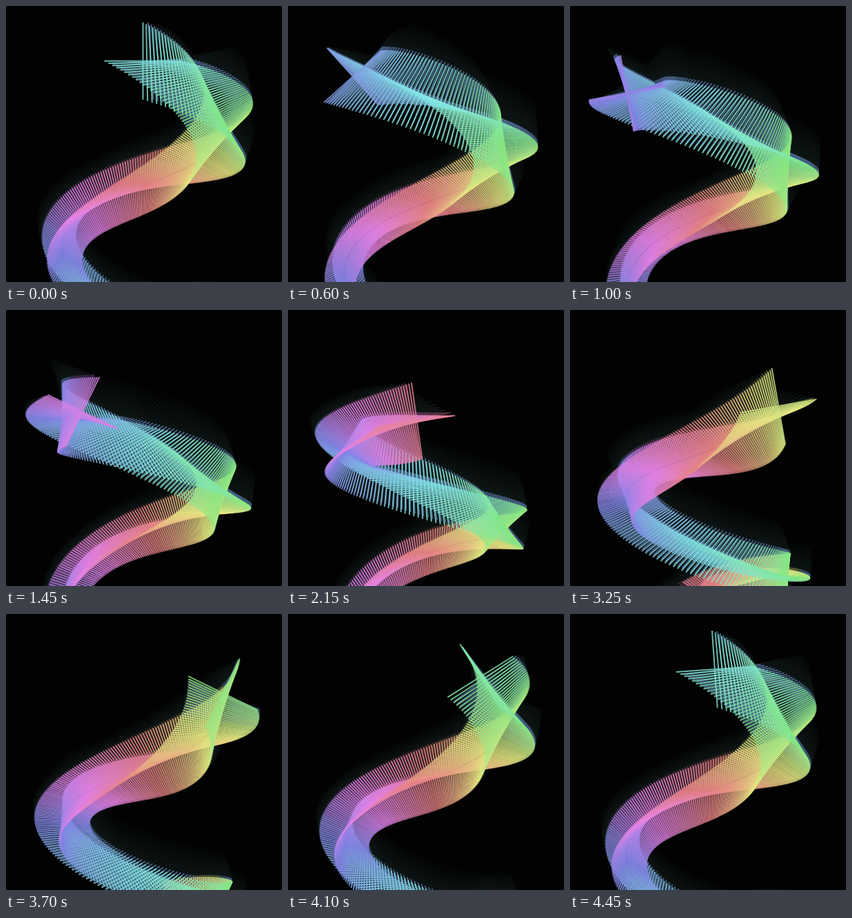
These frames come from a looping animation (400 px wide and 400 px high, 4.5 s). An HTML page with a canvas:

```html
<!DOCTYPE html>
<html lang="en">
<head>
<meta charset="utf-8">
<title>Ribbon of crosses</title>
<style>
  html, body { margin: 0; width: 100%; height: 100%; overflow: hidden; background: #020202; }
  canvas { display: block; width: 100vw; height: 100vh; }
</style>
</head>
<body>
<canvas id="stage" width="400" height="400"></canvas>
<script>
const ctx = document.getElementById('stage').getContext('2d');
const LOOP = 4500, STEP = 50;
const DEG = Math.PI / 180;
const TAIL = 450;   // length of the ribbon in degrees of phase
const GAP = 2;      // degrees between crosses
const ARM = 56;

// A helix seen in perspective: each cross sinks and shrinks as it ages.
function place(head, lag) {
  const a = (head - lag) * DEG;
  const depth = 1 / (1 - 0.316 * Math.cos(a));
  return {
    x: 198.5 - 111 * Math.sin(a) * depth,
    y: 249 + (0.72 * lag - 115.7) * depth,
    arm: ARM * (1 - lag / 800),
    turn: (head - lag / 2) * DEG,
    hue: ((175 + head - lag) % 360 + 360) % 360
  };
}

function drawRibbon(head, width, colour) {
  ctx.lineWidth = width;
  for (let lag = TAIL; lag >= 0; lag -= GAP) {
    const p = place(head, lag);
    if (p.y - p.arm > 400) continue;
    const dx = p.arm * Math.cos(p.turn);
    const dy = p.arm * Math.sin(p.turn);
    ctx.strokeStyle = colour(p.hue);
    ctx.beginPath();
    ctx.moveTo(p.x - dx, p.y - dy);
    ctx.lineTo(p.x + dx, p.y + dy);
    ctx.moveTo(p.x + dy, p.y - dx);
    ctx.lineTo(p.x - dy, p.y + dx);
    ctx.stroke();
  }
}

function shade(age) {
  const k = 1 - (age - 100) / 500;
  return `rgb(${Math.round(3 + 10 * k)},${Math.round(4 + 17 * k)},${Math.round(4 + 16 * k)})`;
}

// The last step lingers: slate under cool hues, dull under warm ones.
function afterglow(hue) {
  const cool = Math.cos((hue - 170) * DEG);
  return cool > 0 ? `hsl(215,30%,${28 + 14 * cool}%)` : `hsl(${hue},28%,26%)`;
}

const bright = hue => `hsla(${hue},68%,71%,0.8)`;

function render(time) {
  const phase = t => t / LOOP * 360;
  ctx.fillStyle = '#020202';
  ctx.fillRect(0, 0, 400, 400);
  for (let age = 500; age >= 100; age -= STEP) {
    const tone = shade(age);
    drawRibbon(phase(time - age), 2, () => tone);
  }
  drawRibbon(phase(time - STEP), 1.8, afterglow);
  drawRibbon(phase(time), 2, bright);
}

const start = performance.now();
let shown = -1;
function tick() {
  const elapsed = (performance.now() - start) % LOOP;
  const time = Math.floor(elapsed / STEP) * STEP;
  if (time !== shown) {
    shown = time;
    render(time);
  }
  requestAnimationFrame(tick);
}
tick();
</script>
</body>
</html>
```
